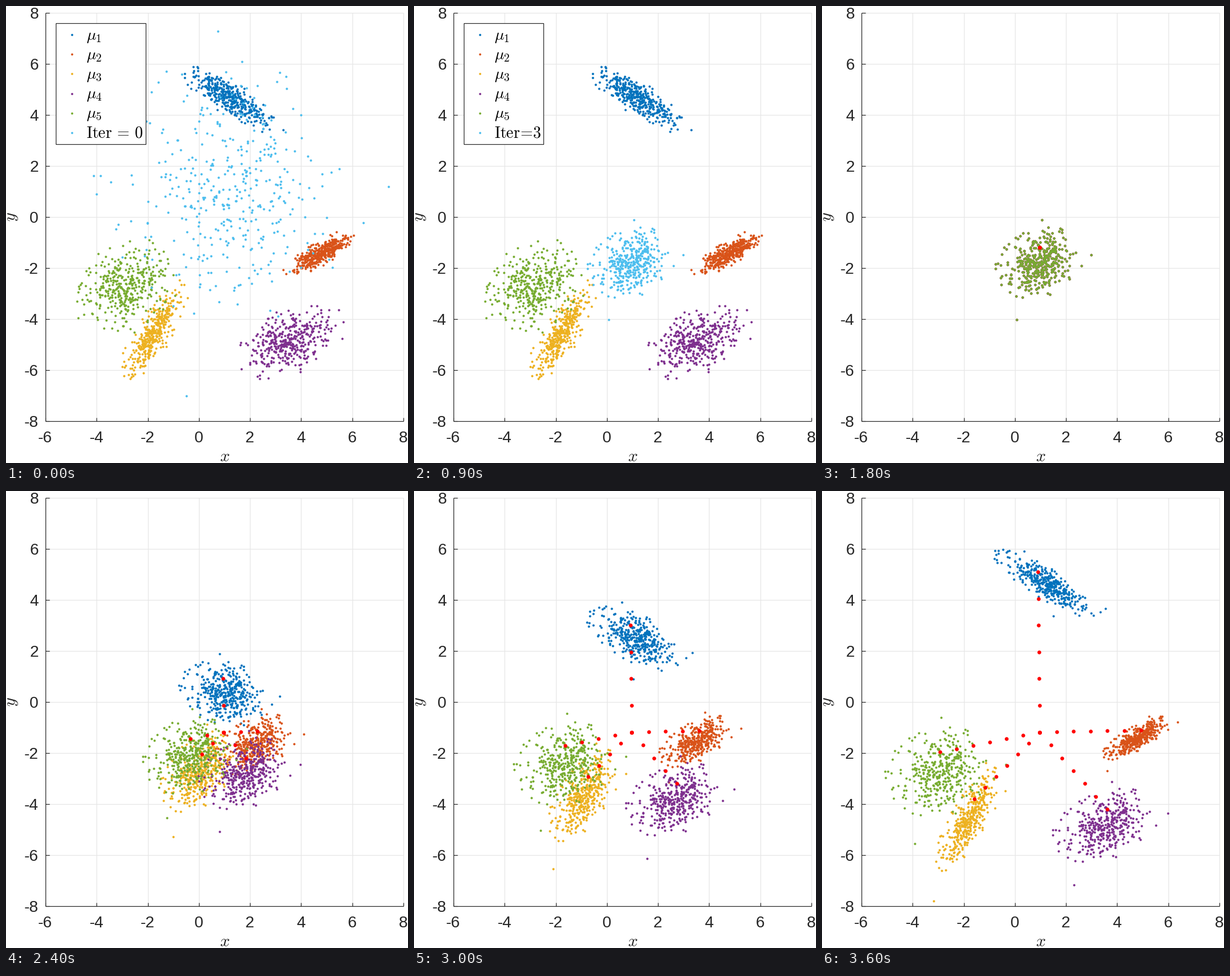
A matplotlib script for the animation above (3900 ms loop, 702 px wide and 797 px high).

```python
import matplotlib.pyplot as plt
import numpy as np
from matplotlib.animation import FuncAnimation
from matplotlib.patches import Rectangle

W, H, DPI = 702, 797, 100
PT = 72 / DPI  # points per pixel
N = 390
ITERS, STEPS = 6, 6
INK, GRID, CYAN, RED = "#262626", "#e6e6e6", "#4DBEEE", "#FF0000"

plt.rcParams["mathtext.fontset"] = "cm"
rng = np.random.default_rng(12)

# Each cluster: colour, mean, symmetric transport matrix (xx, xy, yy).
CLUSTERS = [
    ("#0072BD", (1.25, 4.63), (1.22, -.60, .80)),
    ("#D95319", (4.78, -1.40), (.75, .23, .49)),
    ("#EDB120", (-1.81, -4.59), (.65, .36, 1.30)),
    ("#7E2F8E", (3.54, -4.83), (1.20, .08, 1.02)),
    ("#77AC30", (-2.92, -2.74), (1.27, -.05, 1.28)),
]

# The starting cloud is isotropic; one affine map takes it to the barycenter.
START, SIGMA = np.array([1.22, 1.0]), 2.0
CENTER = np.array([.95, -1.79])
SHRINK = np.array([[.325, .04], [.04, .27]])
TRACKED = np.array([[.97, -1.18]])
FAR = [(-.5, -7), (7.42, 1.2), (.75, 7.28), (-4, .9)]


def normal(n, radius=2.8):
    """Standard normal samples kept inside a radius."""
    z = rng.standard_normal((2 * n, 2))
    return z[np.hypot(*z.T) < radius][:n]


def transport(pts, cluster, t=1):
    """Move barycenter points the fraction t of the way to a cluster."""
    _, mean, (xx, xy, yy) = cluster
    goal = mean + (pts - CENTER) @ np.array([[xx, xy], [xy, yy]])
    return (1 - t) * pts + t * goal


def to_bary(pts):
    return CENTER + (pts - START) @ SHRINK


def px(x):
    return 69.1 + (np.asarray(x) + 6) * 44.63


def py(y):
    return 12.2 + (8 - np.asarray(y)) * 44.5


cloud = np.vstack([START + SIGMA * normal(N - len(FAR)), FAR])
bary = to_bary(cloud)
samples = [transport(to_bary(START + SIGMA * normal(N)), c) for c in CLUSTERS]

fig = plt.figure(figsize=(W / DPI, H / DPI), dpi=DPI, facecolor="white")
ax = fig.add_axes([0, 0, 1, 1])
ax.set_xlim(0, W)
ax.set_ylim(H, 0)
ax.axis("off")


def line(xs, ys, color, z):
    ax.plot(xs, ys, color=color, lw=1.2 * PT, zorder=z,
            solid_capstyle="butt")


def label(x, y, s, size=28, **kw):
    kw = {"va": "baseline", "color": INK, "family": "Liberation Sans", **kw}
    return ax.text(x, y, s, fontsize=size * PT, **kw)


def dots(color, size=4, z=3):
    return ax.plot([], [], "o", ms=size * PT, mew=0, color=color, zorder=z)[0]


def place(artist, pts):
    artist.set_data(px(pts[:, 0]), py(pts[:, 1]))


# Axes
left, right, top, bottom = px(-6), px(8), py(8), py(-8)
for v in range(-6, 9, 2):
    line([px(v)] * 2, [top, bottom], GRID, 0)
    line([px(v)] * 2, [bottom, bottom - 6.5], INK, 1)
    label(px(v) - .6, 761, str(v), ha="center")
for v in range(-8, 9, 2):
    line([left, right], [py(v)] * 2, GRID, 0)
    line([left, left + 6.5], [py(v)] * 2, INK, 1)
    label(57, py(v) + 9.8, str(v), ha="right")
line([left, left], [top, bottom], INK, 1)
line([left, right], [bottom, bottom], INK, 1)
label(381.5, 794, "$x$", 30, ha="center")
label(9.5, 367.5, "$y$", 30, ha="center", va="center", rotation=90)

groups = [dots(c[0]) for c in CLUSTERS]
cyan = dots(CYAN, z=4)
trail = dots(RED, 6.6, 5)

# Legend
box = Rectangle((87.4, 30), 157, 210.5, fc="white", ec=INK, lw=1.2 * PT,
                zorder=6)
ax.add_patch(box)
legend = [box]
for k, color in enumerate([c[0] for c in CLUSTERS] + [CYAN]):
    y = 50 + 34.2 * k
    key = dots(color, 3.8, 7)
    key.set_data([115], [y])
    text = label(140, y + 8.5, rf"$\mu_{k + 1}$", color="black", zorder=7)
    legend += [key, text]
iter_text = legend[-1]


def update(i):
    fitting = i < ITERS
    for art in legend + [cyan]:
        art.set_visible(fitting)
    trail.set_visible(not fitting)
    if fitting:
        for group, pts in zip(groups, samples):
            place(group, pts)
        place(cyan, bary if i else cloud)
        gap = r"\!" if i else r"\,"
        iter_text.set_text(rf"$\mathrm{{Iter}}{gap}={gap}{i}$")
        box.set_width(138.5 if i else 157)
    else:
        step = i - ITERS
        for group, c in zip(groups, CLUSTERS):
            place(group, transport(bary, c, step / STEPS))
        place(trail, np.vstack([transport(TRACKED, c, s / STEPS)
                                for c in CLUSTERS for s in range(step + 1)]))
    return groups + legend + [cyan, trail]


anim = FuncAnimation(fig, update, frames=ITERS + STEPS + 1, interval=300,
                     repeat=True, repeat_delay=0, blit=False)
plt.show()
```
